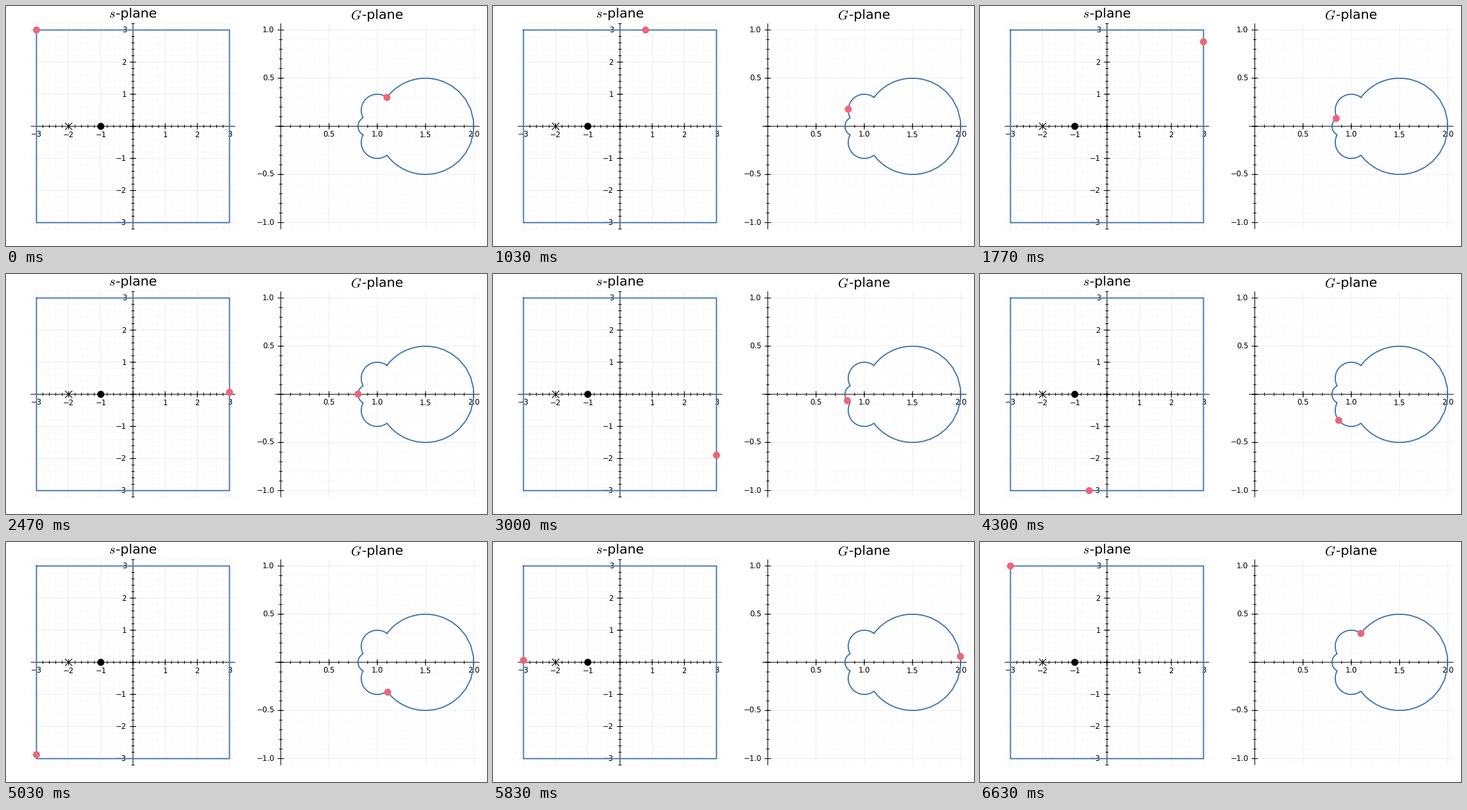
Write a matplotlib script that moves like this. It is 750 by 375 pixels and loops after 6.66 s.

```python
import numpy as np
import matplotlib.pyplot as plt
from matplotlib.animation import FuncAnimation
from matplotlib.collections import LineCollection
from matplotlib.patches import Circle

DPI = 100
PX = 72 / DPI
BLUE, RED = "#4477AA", "#EE6677"
SIDE = 50
TICK_MS, LOOP_MS = 20, 6660

plt.rcParams.update({
    "font.family": "DejaVu Sans",
    "mathtext.fontset": "cm",
    "text.hinting": "none",
})

fig = plt.figure(figsize=(7.5, 3.75), dpi=DPI, facecolor="white")
ax = fig.add_axes([0, 0, 1, 1])
ax.set(xlim=(0, 750), ylim=(375, 0))
ax.axis("off")


def segments(lines, color, width, alpha=1, z=1):
    ax.add_collection(LineCollection(lines, colors=color, linewidths=width * PX,
                                     alpha=alpha, zorder=z, capstyle="butt",
                                     snap=False))


def label(x, y, s, ha, size=11.6):
    ax.text(x, y, s, ha=ha, va="baseline", fontsize=size * PX, zorder=3)


class Plane:
    """Axes through the origin, with grid, ticks and labels."""

    def __init__(self, x0, y0, scale, xlim, ylim, major, fmt):
        self.x0, self.y0, self.scale = x0, y0, scale
        self.xlim, self.ylim = xlim, ylim
        self.fmt = fmt
        for step, alpha, half in ((major / 5, 0.05, 2.5), (major, 0.1, 5)):
            self.draw_steps(step, alpha, half)
        (left, top), (right, bottom) = self.px(xlim[0], ylim[1]), self.px(xlim[1], ylim[0])
        segments([[(left, y0), (right, y0)], [(x0, top), (x0, bottom)]], "black", 1, z=2)
        self.draw_labels(major)

    def px(self, x, y):
        return self.x0 + self.scale * x, self.y0 - self.scale * y

    @staticmethod
    def steps(lim, step):
        lo, hi = np.ceil(lim[0] / step - 1e-6), np.floor(lim[1] / step + 1e-6)
        return np.arange(lo, hi + 1) * step

    def draw_steps(self, step, alpha, half):
        grid, ticks = [], []
        for v in self.steps(self.xlim, step):
            x, y = self.px(v, 0)
            grid.append([self.px(v, self.ylim[0]), self.px(v, self.ylim[1])])
            ticks.append([(x, y - half), (x, y + half)])
        for v in self.steps(self.ylim, step):
            x, y = self.px(0, v)
            grid.append([self.px(self.xlim[0], v), self.px(self.xlim[1], v)])
            ticks.append([(x - half, y), (x + half, y)])
        segments(grid, "black", 0.45, alpha)
        segments(ticks, "black", 1, z=2)

    def draw_labels(self, major):
        def text(v):
            return format(v, self.fmt).replace("-", "\u2212")

        for v in self.steps(self.xlim, major):
            if abs(v) > 1e-9:
                label(self.px(v, 0)[0], self.y0 + 17, text(v), "center")
        for v in self.steps(self.ylim, major):
            if abs(v) > 1e-9:
                label(self.x0 - 10, self.px(0, v)[1] + 4, text(v), "right")

    def curve(self, z):
        x, y = self.px(z.real, z.imag)
        ax.plot(x, y, color=BLUE, lw=1.9 * PX, snap=False, zorder=4,
                solid_joinstyle="round")

    def dot(self, z, color, zorder):
        return ax.add_patch(Circle(self.px(z.real, z.imag), 5.5, fc=color,
                                   ec="none", zorder=zorder))


def title(x, y, letter):
    label(x, y, f"${letter}$", "right", 20.5)
    label(x, y, "-plane", "left", 20.5)


s_plane = Plane(198, 188, 50.16, (-3.18, 3.18), (-3.205, 3.205), 1, ".0f")
g_plane = Plane(428.5, 188, 150.47, (-0.06, 2.06), (-1.068, 1.068), 0.5, ".1f")
title(170.7, 17.8, "s")
title(554.7, 20.3, "G")

# Clockwise square, each corner held twice
up = np.linspace(-3, 3, SIDE)
s = np.concatenate([up + 3j, 3 - 1j * up, -up - 3j, -3 + 1j * up])
g = (s + 1) / (s + 2)

s_plane.curve(s)
g_plane.curve(g)

# Pole and zero
px, py = s_plane.px(-2, 0)
segments([[(px - 5.6, py - 5.6), (px + 5.6, py + 5.6)],
          [(px - 5.6, py + 5.6), (px + 5.6, py - 5.6)]], "black", 1.1, z=5)
s_plane.dot(-1 + 0j, "black", 5)

s_dot = s_plane.dot(s[0], RED, 6)
g_dot = g_plane.dot(g[0], RED, 6)


def update(k):
    # 30 steps a second, each starting on the nearest 10 ms
    mid = (k + 0.5) * TICK_MS
    i = int((mid + 5) * 30 // 1000)
    s_dot.center = s_plane.px(s[i].real, s[i].imag)
    g_dot.center = g_plane.px(g[i].real, g[i].imag)
    return s_dot, g_dot


anim = FuncAnimation(fig, update, frames=LOOP_MS // TICK_MS, interval=TICK_MS,
                     repeat=True, repeat_delay=0)
plt.show()
```
